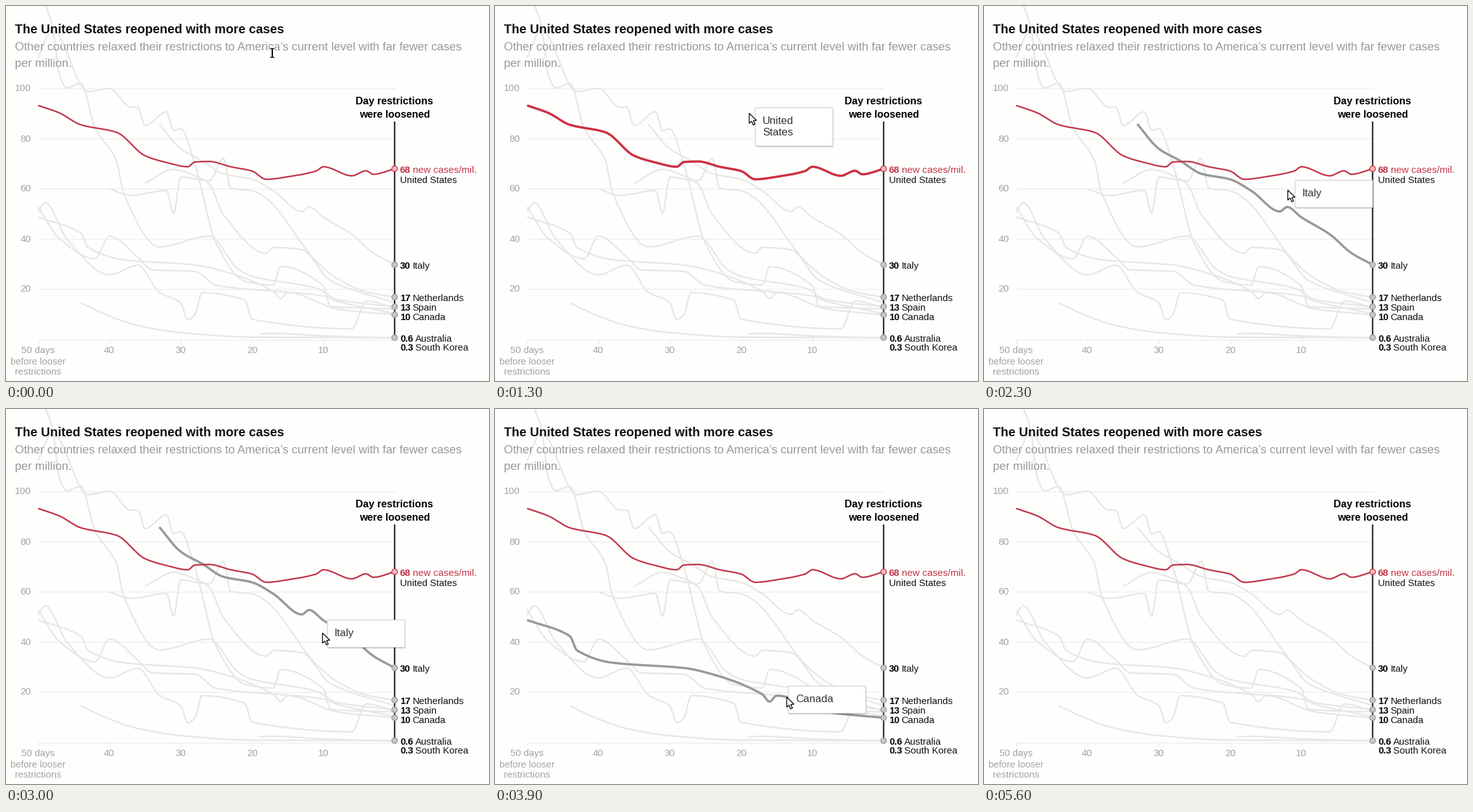
Animation, 760 px wide and 591 px high, one loop 5.9 s. Source, as a matplotlib script:

```python
import matplotlib.pyplot as plt
import numpy as np
from matplotlib.animation import FuncAnimation
from matplotlib.patches import Circle, Polygon, Rectangle

W, H, DPI = 760, 591, 64
STEP, LOOP = 100, 5900
PT = 72 / DPI  # points per pixel

BG = "#fefefd"
RED, RED_HOT = "#c13648", "#cb2f42"
PALE, HOT = "#e7e7e6", "#999999"
INK, SOFT_INK, AXIS_INK = "#121212", "#999997", "#a3a3a1"
HOME = "United States"

plt.rcParams["font.family"] = "Liberation Sans"

# Turning points of each curve: days before reopening, cases per million.
CURVES = {
    "Denmark": [(50, 112), (48, 123), (43, 98.5), (40, 99.8), (37, 92.3), (36, 92.3),
                (35, 85), (32, 90.5), (31, 83), (30, 83.7), (28, 69.5), (25, 38),
                (21, 23), (17, 21.5), (16, 28.9), (10, 21.3), (9, 13), (0, 12)],
    "Germany": [(50, 52.6), (47, 40), (42, 32), (40, 41), (36, 32.6), (34, 27.6),
                (28, 27), (25, 21.4), (10, 17.2), (8, 15), (0, 10.2)],
    "Portugal": [(35, 62), (31, 67.5), (28, 65), (26, 61.7), (24, 49.5), (18, 34.2),
                 (17, 36.5), (13, 35.6), (9, 23.3), (0, 14.5)],
    "South Korea": [(19, 2.1), (17, 2.3), (10, 1.3), (0, 0.4)],
    "France": [(50, 50.6), (49, 54.3), (46, 40), (40, 25.6), (36, 29.4), (33, 18.7),
               (30, 14.5), (29, 7.7), (28, 9.7), (27, 18.5), (21, 15.5), (20, 7.9),
               (6, 4.1), (4, 15.2), (0, 12.4)],
    "Spain": [(49, 133), (48, 125), (47, 105), (46, 100), (44, 101.8), (42, 84),
              (39, 71), (38, 58), (33, 36.7), (26, 41), (22, 28), (20, 25),
              (11, 20.3), (8, 15.7), (0, 12.9)],
    "Netherlands": [(40, 59.8), (37, 57.2), (32, 59.2), (31, 50), (30, 64.5), (26, 63),
                    (24, 72), (23, 60), (20, 59), (18, 56), (11, 31), (8, 24),
                    (4, 18.8), (0, 16.7)],
    "Italy": [(33, 85.6), (30, 75.8), (27, 71), (24, 65.8), (20, 63.6), (17, 59),
              (13, 50.8), (12, 52.6), (10, 48.5), (6, 41.7), (3, 34.3), (0, 29.6)],
    "Canada": [(50, 48.6), (44, 42.2), (43, 36.5), (38, 31.6), (28, 29.5), (24, 27),
               (17, 19), (16, 16.1), (15, 18.5), (8, 12), (0, 9.7)],
    "Australia": [(44, 14.4), (40, 9.2), (36, 5.4), (30, 2.6), (20, 0.8), (0, 0.6)],
    HOME: [(50, 93), (47, 90), (44, 85.3), (39, 82.3), (35, 73), (32, 70.3),
           (29, 68.6), (28, 70.5), (26, 70.7), (23, 68.6), (20, 66.9), (18, 63.6),
           (15, 64.6), (11, 66.9), (10, 68.6), (6, 65), (4, 67), (3, 65.6), (0, 67.8)],
}

# Start time in ms and the curve under the pointer from then on.
HOVER = [
    (0, None), (900, "Netherlands"), (1200, HOME), (2200, "Italy"),
    (3200, "Netherlands"), (3600, "Spain"), (3800, "Canada"), (4100, "France"),
    (4600, "Australia"), (5200, "Spain"), (5600, None),
]

# Pointer path (ms, x, y) and tooltip corner relative to it (ms, dx, dy).
PATH = [
    (600, 419, 74), (1300, 400, 169), (2300, 478, 290), (3000, 498, 353),
    (3300, 512, 400), (3400, 512, 400), (3900, 459, 454), (4800, 271, 507),
    (5000, 268, 514), (5200, 252, 386), (5600, 262, 330),
]
OFFSET = [(1300, 8, -10), (2300, 10, -17), (3000, 6, -22), (3900, 1, -19), (4800, 0, -24)]

ARROW = np.array([
    (0, 0), (0, 16), (3.7, 12.6), (6.3, 18.6), (9, 17.4), (6.5, 11.6), (11.5, 11.4),
])


def day_x(day):
    return 611.5 - 11.22 * day


def value_y(value):
    return 525 - 3.96 * value


def smooth(points, per_day=5):
    """Monotone cubic through the points, in stage pixels."""
    day, value = np.array(points, float).T
    x, y = day_x(day), value_y(value)
    h = np.diff(x)
    d = np.diff(y) / h
    a, b = d[:-1], d[1:]
    m = np.concatenate([d[:1], np.zeros(len(a)), d[-1:]])
    same = a * b > 0
    m[1:-1][same] = 2 * a[same] * b[same] / (a[same] + b[same])
    xs = np.linspace(x[0], x[-1], int(day[0] * per_day) + 1)
    i = np.clip(np.searchsorted(x, xs, side="right") - 1, 0, len(h) - 1)
    t = (xs - x[i]) / h[i]
    bend = (t**2 * (3 * d[i] - 2 * m[i] - m[i + 1])
            + t**3 * (m[i] + m[i + 1] - 2 * d[i]))
    return xs, y[i] + h[i] * (t * m[i] + bend)


def track(points, ms):
    time, x, y = np.array(points).T
    return np.array([np.interp(ms, time, x), np.interp(ms, time, y)])


fig = plt.figure(figsize=(W / DPI, H / DPI), dpi=DPI, facecolor=BG)
ax = fig.add_axes([0, 0, 1, 1])
ax.set_xlim(0, W)
ax.set_ylim(H, 0)
ax.axis("off")


def label(x, y, s, size, color=INK, bold=False, ha="left", z=6):
    return ax.text(x, y, s, size=size * PT, color=color, ha=ha, va="baseline",
                   weight="bold" if bold else "normal", zorder=z)


def stroke(xs, ys, color, width, z, **kw):
    return ax.plot(xs, ys, color=color, lw=width * PT, zorder=z, **kw)[0]


def draw_axes():
    for value in range(0, 101, 20):
        y = np.floor(value_y(value)) + 0.5
        stroke([50.5, 611.5], [y, y], "#ebebea", 1.2, 1)
        if value:
            label(39.5, y + 5, str(value), 15.3, AXIS_INK, ha="right")
    for day in range(10, 51, 10):
        x = np.floor(day_x(day)) + 0.5
        stroke([x, x], [525.5, 531], "#e4e4e2", 1, 1)
        label(x, 547, "50 days" if day == 50 else str(day), 15, AXIS_INK, ha="center")
    label(50, 565, "before looser", 14.8, AXIS_INK, ha="center")
    label(50, 581, "restrictions", 15, AXIS_INK, ha="center")


def draw_text():
    label(14, 43, "The United States reopened with more cases", 19.9, bold=True)
    label(14, 70, "Other countries relaxed their restrictions to America’s "
          "current level with far fewer cases", 18.35, SOFT_INK)
    label(14, 96, "per million.", 18.4, SOFT_INK)
    label(611.5, 155, "Day restrictions", 16.1, "black", True, "center")
    label(611.5, 176, "were loosened", 16, "black", True, "center")
    label(620, 263, "68", 15.2, RED, True)
    label(639.5, 263, "new cases/mil.", 15.4, RED)
    label(620, 279, HOME, 14.9)
    ends = [(414, "30", "Italy"), (465, "17", "Netherlands"), (480, "13", "Spain"),
            (495, "10", "Canada"), (529, "0.6", "Australia"),
            (543, "0.3", "South Korea")]
    for y, num, name in ends:
        label(620, y, num, 14.9, "black", True)
        label(639.5 if len(num) == 2 else 643.5, y, name, 15)


def draw_marks():
    stroke([611.5, 611.5], [182, 523], "black", 1.9, 7,
           solid_capstyle="butt", snap=False)
    for name in ("Italy", "Netherlands", "Spain", "Canada", "Australia", HOME):
        fill, edge = ("#f8b8bc", RED) if name == HOME else ("#c6c6c6", HOT)
        ax.add_patch(Circle((611.5, value_y(CURVES[name][-1][1])), 4.4, fc=fill,
                            ec=edge, lw=1.3 * PT, zorder=8))


draw_axes()
draw_text()
draw_marks()
lines = {name: stroke(*smooth(points), PALE, 2.4, 2, solid_capstyle="butt",
                      solid_joinstyle="round")
         for name, points in CURVES.items()}

# Tooltip: soft shadow layers, box and up to two lines of text.
shadows = [ax.add_patch(Rectangle((0, 0), 122, 44, fc="black", ec="none",
                                  alpha=0.09, zorder=10)) for _ in range(3)]
box = ax.add_patch(Rectangle((0, 0), 122, 44, fc="white", ec="#cccccc",
                             lw=PT, zorder=11))
words = [label(0, 0, "", 16.9, "#333333", z=12) for _ in range(2)]

# Pointer: an arrow over the chart, a text beam over the heading.
arrow = ax.add_patch(Polygon(ARROW, fc="white", ec="black", lw=1.3 * PT,
                             joinstyle="miter", zorder=14))
beam = [stroke([], [], color, width, z, solid_capstyle="projecting")
        for color, width, z in [("white", 3.4, 13), ("black", 1.5, 14)]]
SIDE_X, SIDE_Y = [-2.5, -1, 0, 0, -1, -2.5], [-7, -7, -6, 6, 7, 7]
BEAM_X = np.array(SIDE_X + [np.nan] + [-x for x in SIDE_X])
BEAM_Y = np.array(SIDE_Y + [np.nan] + SIDE_Y)


def style_lines(active):
    for name, line in lines.items():
        hot = name == active
        if name == HOME:
            line.set(color=RED_HOT if hot else RED, zorder=5)
        else:
            line.set(color=HOT if hot else PALE, zorder=4 if hot else 2)
        line.set_linewidth((3.6 if hot else 2.4) * PT)


def place_tooltip(name, corner):
    for part in [box, *shadows, *words]:
        part.set_visible(name is not None)
    if name is None:
        return
    x, y = np.round(corner)
    parts = name.split()
    height = 61 if len(parts) == 2 else 44
    box.set(xy=(x + 0.5, y + 0.5), height=height - 0.5)
    for k, shadow in enumerate(shadows, 1):
        shadow.set(xy=(x + k, y + k), height=height)
    for k, word in enumerate(words):
        word.set_text(parts[k] if k < len(parts) else "")
        word.set_position((x + 13, y + 27 + 18 * k))


def place_pointer(ms, pos):
    shown = ms < 400 or 600 <= ms < 5600
    over_text = pos[1] < 100
    arrow.set_visible(shown and not over_text)
    arrow.set_xy(ARROW + pos)
    for line in beam:
        line.set_visible(shown and over_text)
        line.set_data(BEAM_X + pos[0], BEAM_Y + pos[1])


def draw(frame):
    ms = frame * STEP
    pos = track(PATH, ms)
    active = [name for start, name in HOVER if start <= ms][-1]
    style_lines(active)
    place_tooltip(active, pos + track(OFFSET, ms))
    place_pointer(ms, pos)
    return []


anim = FuncAnimation(fig, draw, frames=LOOP // STEP, interval=STEP, repeat=True)
plt.show()
```
